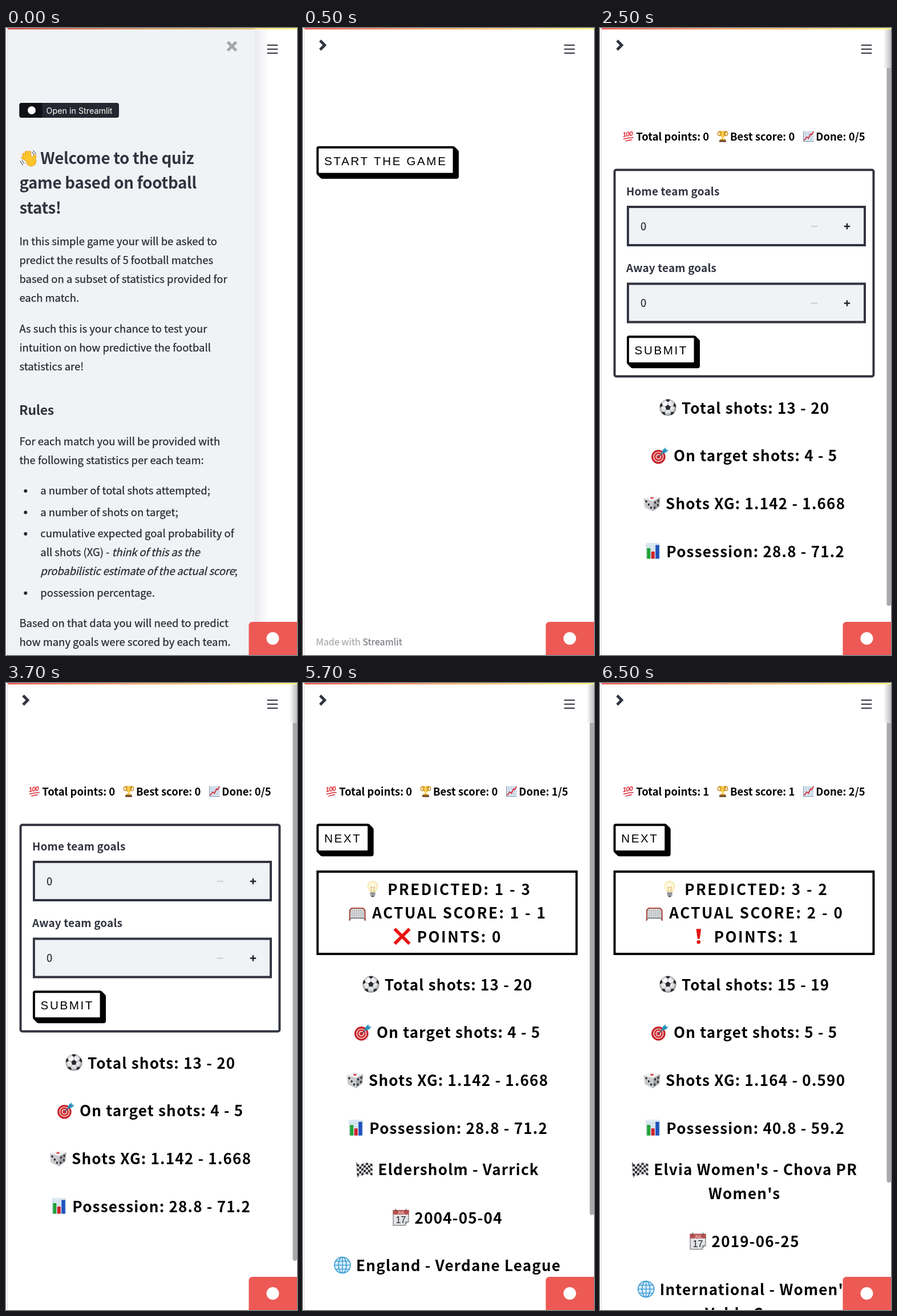
Write an HTML page with a canvas that moves like this. It is 510 px wide and 1097 px high and loops after 8 s.

```html
<!DOCTYPE html>
<html lang="en">
<head>
<meta charset="utf-8">
<title>Football quiz</title>
<style>
html, body { margin: 0; width: 100%; height: 100%; overflow: hidden; background: #fff; }
canvas { display: block; width: 510px; height: 1097px; }
</style>
</head>
<body>
<canvas id="stage"></canvas>
<script>
const W = 510, H = 1097, LOOP = 8000;
const INK = '#31333f', DARK = '#262730', PALE = '#f0f2f6';
const BODY = 20.64;
const SANS = '"Noto Sans CJK JP", "Noto Sans CJK SC", "Noto Sans CJK", "Open Sans", sans-serif';
const ARIAL = '"Liberation Sans", Arial, sans-serif';
const canvas = document.getElementById('stage');
const c = canvas.getContext('2d');
const dpr = window.devicePixelRatio || 1;
canvas.width = W * dpr;
canvas.height = H * dpr;

// ---- basic shapes
function box(x, y, w, h, col, r = 0) {
  c.fillStyle = col;
  c.beginPath();
  c.roundRect(x, y, w, h, r);
  c.fill();
}
function frame(x, y, w, h, lw, col, r = 0) {
  c.strokeStyle = col;
  c.lineWidth = lw;
  c.lineJoin = 'miter';
  c.beginPath();
  c.roundRect(x + lw / 2, y + lw / 2, w - lw, h - lw, r);
  c.stroke();
}
function dot(x, y, rx, col, ry = rx) {
  c.fillStyle = col;
  c.beginPath();
  c.ellipse(x, y, rx, ry, 0, 0, 7);
  c.fill();
}
function trace(p) {
  c.beginPath();
  for (let i = 0; i < p.length; i += 2) c.lineTo(p[i], p[i + 1]);
}
function poly(col, ...p) {
  trace(p);
  c.fillStyle = col;
  c.fill();
}
function line(col, lw, ...p) {
  trace(p);
  c.strokeStyle = col;
  c.lineWidth = lw;
  c.stroke();
}
function ring(x, y, rx, ry, col, lw, a = 0, b = 7) {
  c.strokeStyle = col;
  c.lineWidth = lw;
  c.beginPath();
  c.ellipse(x, y, rx, ry, 0, a, b);
  c.stroke();
}
function fade(x0, x1, ...cols) {
  const g = c.createLinearGradient(x0, 0, x1, 0);
  cols.forEach((col, i) => g.addColorStop(i / (cols.length - 1), col));
  return g;
}

// ---- text
function setFont(size, weight = 400, gap = 0, style = '') {
  // the CJK family draws its Latin letters about 12% larger
  c.font = `${style} ${weight} ${size / 1.1175}px ${SANS}`;
  c.letterSpacing = (weight === 600 ? gap - size * 0.005 : gap) + 'px';
}
function put(s, x, y, col) {
  c.fillStyle = col;
  c.fillText(s, x, y);
  return x + c.measureText(s).width;
}
function text(s, x, y, size = BODY, weight = 400, col = DARK, gap = 0, style = '') {
  setFont(size, weight, gap, style);
  if (weight === 400) {
    // a hairline gives regular text its slightly heavier look
    c.strokeStyle = col;
    c.lineWidth = 0.25;
    c.strokeText(s, x, y);
  }
  return put(s, x, y, col);
}
function plain(s, x, y, font, gap, col) {
  c.font = font;
  c.letterSpacing = gap + 'px';
  put(s, x, y, col);
}

// ---- pictograms, each in a 30 by 30 box
const icons = {
  wave() {
    c.lineCap = 'round';
    const skin = '#fcc42c', edge = '#e09a1c';
    const tips = [[6, 15], [7.5, 9.5], [12, 6], [17, 6]];
    for (const [x, y] of tips) line(edge, 5.4, 18, 21, x, y);
    line(edge, 5.6, 24, 21, 26, 12.5);
    dot(20, 21, 8.7, edge);
    for (const [x, y] of tips) line(skin, 4, 18, 21, x, y);
    line(skin, 4.2, 24, 21, 26, 12.5);
    dot(20, 21, 8, skin);
    for (const r of [9, 12.5]) {
      ring(14, 16, r + 1, r + 1, '#6b6b6e', 1.2, 2.2, 2.8);
      ring(16, 13, r, r, '#6b6b6e', 1.2, -0.95, -0.35);
    }
    c.lineCap = 'butt';
  },
  hundred() {
    c.save();
    c.translate(1, 17);
    c.rotate(-0.14);
    plain('100', 0, 0, 'italic 700 17.5px ' + ARIAL, -1, '#dc2430');
    c.restore();
    c.lineCap = 'round';
    line('#dc2430', 2.4, 3, 22, 15, 19.5, 28, 18);
    line('#dc2430', 2.2, 8, 27.5, 15, 25.5, 24, 24);
    c.lineCap = 'butt';
  },
  trophy() {
    ring(6.5, 8, 4.5, 5.5, '#c98a16', 2.2);
    ring(23.5, 8, 4.5, 5.5, '#c98a16', 2.2);
    poly(fade(6, 24, '#c98712', '#ffd95a', '#b8730c'), 6, 1, 24, 1, 22.5, 12, 17, 18, 17, 23, 13, 23, 13, 18, 7.5, 12);
    box(8, 22, 14, 3, '#d59a1f');
    box(6, 25, 18, 5, '#6b4020', 1);
  },
  rise() {
    box(1, 1, 28, 28, '#dbe6f0');
    for (let i = 8; i < 29; i += 7) {
      line('#b4c5d6', 1, 1, i, 29, i);
      line('#b4c5d6', 1, i, 1, i, 29);
    }
    line('#8096ab', 1.5, 1.5, 1, 1.5, 28.5, 29, 28.5);
    line('#d9232e', 2.6, 3, 26, 10, 17, 15, 20, 20, 9, 23, 11, 28, 2);
  },
  ball() {
    const g = c.createRadialGradient(12, 9, 2, 15, 15, 15);
    g.addColorStop(0, '#fff');
    g.addColorStop(0.7, '#dedfe1');
    g.addColorStop(1, '#85878b');
    dot(15, 15, 14.6, g);
    c.save();
    c.beginPath();
    c.arc(15, 15, 14.4, 0, 7);
    c.clip();
    const spot = (x, y, r, turn) => {
      const p = [];
      for (let i = 0; i < 5; i++) {
        const a = turn + i * Math.PI * 0.4;
        p.push(x + r * Math.cos(a), y + r * Math.sin(a));
      }
      poly('#2b2c30', ...p);
    };
    for (let i = 0; i < 5; i++) {
      const a = -Math.PI / 2 + i * Math.PI * 0.4;
      const x = 15 + 13.5 * Math.cos(a), y = 15 + 13.5 * Math.sin(a);
      line('#8b8d91', 0.8, 15, 15, x, y);
      spot(x, y, 3.8, a + Math.PI);
    }
    spot(15, 15, 5, -Math.PI / 2);
    c.restore();
  },
  target() {
    for (const [r, col] of [[12.3, '#c7242b'], [9, '#f3e6e4'], [7.6, '#d32a30'], [4.8, '#f3e6e4'], [3.2, '#d32a30']])
      dot(12.5, 17.5, r, col);
    line('#4c5662', 1.6, 12.5, 17.5, 22, 9);
    poly('#2c9bc4', 17.5, 12.5, 20, 5.5, 25, 1, 25, 5.5, 30, 5.5, 26, 10);
    line('#1b6f96', 1, 17.5, 12.5, 27, 4);
  },
  die() {
    poly('#f1f1f2', 0.5, 7, 14, 1.5, 29.5, 5, 17.5, 11.5);
    poly('#c9cacd', 0.5, 7, 17.5, 11.5, 16.5, 29.5, 2.5, 22.5);
    poly('#a3a5a9', 17.5, 11.5, 29.5, 5, 28, 21, 16.5, 29.5);
    dot(15, 6, 3, '#d3343a', 1.4);
    for (const [x, y] of [[5, 12], [9.3, 17.5], [13.5, 23]]) dot(x, y, 1.6, '#27282c', 2.1);
    for (const [x, y] of [[20.5, 14], [26, 11], [19.8, 23], [25.3, 18.5]]) dot(x, y, 1.5, '#27282c', 2);
  },
  bars() {
    box(3, 1, 25, 28, '#dce8f2');
    for (let y = 7; y < 28; y += 6) line('#bdcfdf', 0.8, 3, y, 28, y);
    box(5, 10, 6, 18.5, '#1fa336');
    box(12.5, 16, 6, 12.5, '#d3232b');
    box(20, 4.5, 6.5, 24, '#1f52bd');
  },
  bulb() {
    const g = c.createRadialGradient(14, 10, 1, 15, 11, 11);
    g.addColorStop(0, '#fffef0');
    g.addColorStop(0.6, '#fdf4cc');
    g.addColorStop(1, '#ecd9a0');
    poly('#f3e4b4', 6.5, 14, 23.5, 14, 19.5, 22, 10.5, 22);
    dot(15, 10.5, 9.5, g);
    line('#d9b060', 1, 13, 20, 12, 11, 15, 13, 18, 11, 17, 20);
    box(10.5, 21, 9, 6.5, '#a2a5a9', 1);
    line('#73767b', 1, 10.5, 23.5, 19.5, 23.5);
    box(12.5, 27, 5, 2.5, '#55585d', 1);
  },
  goal() {
    for (let i = 4; i < 29; i += 3.2) line('#96989d', 0.9, i, 8, i, 25);
    for (let y = 11; y < 26; y += 3.2) line('#96989d', 0.9, 2, y, 28, y);
    line('#707378', 1.3, 1, 29, 4, 25, 26, 25, 29, 29);
    line('#a8463f', 2, 1.3, 29.5, 1.8, 11, 5, 7.5, 25, 7.5, 28.2, 11, 28.7, 29.5);
  },
  cross() {
    line('#ea1410', 5.6, 2, 2, 28, 28);
    line('#ea1410', 5.6, 28, 2, 2, 28);
  },
  bang() {
    poly('#e01512', 10, 2, 18.5, 2, 16.2, 19.5, 12.3, 19.5);
    dot(14.2, 25, 3.2, '#e01512');
  },
  flag() {
    line('#57595e', 1.5, 1.5, 3, 4, 29);
    const sway = x => Math.sin(x / 4.2) * 1.5;
    for (let i = 0; i < 7; i++) for (let j = 0; j < 5; j++) {
      const x = 2 + i * 3.9, y = 5 + j * 4, x2 = x + 3.9;
      poly((i + j) % 2 ? '#dcdddf' : '#2a2b2f',
        x, y + sway(x), x2, y + sway(x2), x2, y + 4 + sway(x2), x, y + 4 + sway(x));
    }
  },
  calendar() {
    poly('#e3e4e6', 1, 2, 29, 2, 29, 22, 22, 29.5, 1, 29.5);
    frame(1, 2, 28, 27.5, 1.2, '#77797e');
    box(1, 2, 28, 8, '#b9514f');
    for (const x of [6, 24]) line('#55575c', 1.6, x, 0, x, 5);
    plain('JUL', 9.5, 8.8, '700 6.5px ' + ARIAL, 0, '#f4d9d8');
    plain('17', 6, 25, '16.5px ' + ARIAL, -0.5, '#232428');
    poly('#8d9095', 29, 21, 22, 29.5, 22, 22.5);
    poly('#fff', 30, 22.5, 30, 30, 22.5, 30);
  },
  globe() {
    dot(15, 15, 14, '#d9eefa');
    for (const rx of [14, 7]) ring(15, 15, rx, 14, '#3b9ad4', 1.6);
    line('#3b9ad4', 1.4, 15, 1, 15, 29);
    line('#3b9ad4', 1.4, 1, 15, 29, 15);
    line('#3b9ad4', 1.4, 3.5, 8, 26.5, 8);
    line('#3b9ad4', 1.4, 3.5, 22, 26.5, 22);
  }
};
function icon(name, x, y, size = 30) {
  c.save();
  c.translate(x, y);
  c.scale(size / 30, size / 30);
  c.letterSpacing = '0px';
  icons[name]();
  c.restore();
}

// ---- page parts
function stat(name, s, y, gap = 1.3, lead = 39) {
  const size = 29.2;
  setFont(size, 600, gap);
  if (!name) lead = 0;
  const x = 252.5 - (lead + c.measureText(s).width - gap) / 2;
  if (name) icon(name, x, y - 25.5);
  text(s, x + lead, y, size, 600, '#000', gap);
}
function stats(y, [shots, target, xg, poss]) {
  stat('ball', 'Total shots: ' + shots, y);
  stat('target', 'On target shots: ' + target, y + 83.7);
  stat('die', 'Shots XG: ' + xg, y + 167.3);
  stat('bars', 'Possession: ' + poss, y + 251);
}
function button(s, x, y, w) {
  for (let i = 0.5; i <= 6.5; i += 0.5) box(x + i, y + i, w, 50.5, '#000', 4);
  box(x, y, w, 50.5, '#000', 4);
  box(x + 3.9, y + 3.9, w - 7.8, 42.7, '#fff', 1);
  plain(s, x + 13.6, y + 33, BODY + 'px ' + ARIAL, 2.58, '#000');
}
function score(points, best, done) {
  const parts = [['hundred', 39.5, 63.3, 'Total points: ' + points],
    ['trophy', 205, 228, 'Best score: ' + best], ['rise', 355.5, 378.3, `Done: ${done}/5`]];
  for (const [name, ix, x, s] of parts) {
    icon(name, ix, 179.5, 20);
    text(s, x, 196.8, BODY, 700, '#000');
  }
}
function scrollbar(end) {
  box(502.5, 40, 7.5, end - 40, '#a9a9ac', 4);
  box(497, 2, 13, 68, fade(497, 510, '#ffffff', '#dedee0', '#bebec1'));
}
function field(label, y) {
  text(label, 46, y - 18.3, 21.2, 700, INK, 0.15);
  box(47, y, 419, 71, PALE);
  frame(47, y, 419, 71, 3.9, INK);
  text('0', 71, y + 42.8);
  line('#d0d2da', 2.4, 370, y + 36, 381, y + 36);
  line(DARK, 2.6, 427.8, y + 36, 438.2, y + 36);
  line(DARK, 2.6, 433, y + 30.8, 433, y + 41.2);
}

// ---- scenes
function sidebar() {
  const x = 23.4, li = 60.3;
  box(436, 2, 24, H, fade(436, 460, '#e9e9ea', '#f5f5f8', '#ffffff'));
  box(3, 2, 433, H, PALE);
  line('#a3a5aa', 5, 388.5, 24.5, 403.5, 39.5);
  line('#a3a5aa', 5, 403.5, 24.5, 388.5, 39.5);

  box(23.5, 131, 174.5, 26, DARK, 4);
  box(23.5, 131, 40, 26, '#0f1116', [4, 0, 0, 4]);
  dot(45, 144, 7, '#fff');
  plain('Open in Streamlit', 70.5, 149.5, '14.3px Inter, sans-serif', 0, '#fff');

  icon('wave', 23.5, 211.5, 31);
  const head = (s, hx, y) => text(s, hx, y, 30.96, 600, INK, -0.15);
  head('Welcome to the quiz', 60.3, 237.5);
  head('game based on football', x, 281.2);
  head('stats!', x, 324.9);

  [['In this simple game your will be asked to', 380],
   ['predict the results of 5 football matches', 413],
   ['based on a subset of statistics provided for', 446],
   ['each match.', 479],
   ['As such this is your chance to test your', 533],
   ['intuition on how predictive the football', 566],
   ['statistics are!', 599],
   ['For each match you will be provided with', 729.7],
   ['the following statistics per each team:', 762.7],
   ['Based on that data you will need to predict', 1048],
   ['how many goals were scored by each team.', 1081]
  ].forEach(([s, y]) => text(s, x, y));
  text('Rules', x - 0.4, 677, 25.7, 600, INK, -0.15);

  [['a number of total shots attempted;', 816.3],
   ['a number of shots on target;', 853.7],
   ['cumulative expected goal probability of', 891.2],
   ['possession percentage.', 995]
  ].forEach(([s, y]) => {
    text(s, li, y);
    dot(34.3, y - 6.3, 3, DARK);
  });
  const slant = (s, sx, y) => text(s, sx, y, BODY, 400, DARK, -0.18, 'italic');
  slant('think of this as the', text('all shots (XG) - ', li, 924.3), 924.3);
  text(';', slant('probabilistic estimate of the actual score', li, 957.3), 957.3);
}
function start() {
  button('START THE GAME', 23.6, 206.8, 242.9);
  const end = text('Made with ', 22.8, 1080, 18.06, 400, '#a9aaae');
  text('Streamlit', end, 1080, 18.06, 400, '#7c7d85');
}
function guess() {
  score(0, 0, 0);
  frame(23.6, 246.3, 457.8, 365.2, 3.9, INK, 3);
  field('Home team goals', 311);
  field('Away team goals', 445.5);
  button('SUBMIT', 47, 538.3, 121.5);
  stats(674.5, ['13 - 20', '4 - 5', '1.142 - 1.668', '28.8 - 71.2']);
  scrollbar(1011);
}
function result(predicted, actual, mark, points, values) {
  button('NEXT', 23.6, 246.3, 93.6);
  frame(23.6, 328, 457.8, 148, 3.9, '#000');
  stat('bulb', 'PREDICTED: ' + predicted, 370.5, 2.6, 41);
  stat('goal', 'ACTUAL SCORE: ' + actual, 412, 2.6, 41);
  stat(mark, 'POINTS: ' + points, 453.7, 2.6, 41);
  stats(537.7, values);
}
function miss() {
  score(0, 0, 1);
  result('1 - 3', '1 - 1', 'cross', 0, ['13 - 20', '4 - 5', '1.142 - 1.668', '28.8 - 71.2']);
  stat('flag', 'Eldersholm - Varrick', 861.3);
  stat('calendar', '2004-05-04', 945.5);
  stat('globe', 'England - Verdane League', 1029);
  scrollbar(931);
}
function hit() {
  score(1, 1, 2);
  result('3 - 2', '2 - 0', 'bang', 1, ['15 - 19', '5 - 5', '1.164 - 0.590', '40.8 - 59.2']);
  stat('flag', "Elvia Women's - Chova PR", 861.3);
  stat('', "Women's", 903.3);
  stat('calendar', '2019-06-25', 987.3);
  stat('globe', "International - Women's", 1071);
  stat('', 'Velda Cup', 1112.7);
  scrollbar(874);
}

const scenes = [[0, sidebar], [500, start], [2500, guess], [4500, miss], [6500, hit]];

function draw(t) {
  c.setTransform(dpr, 0, 0, dpr, 0, 0);
  box(0, 0, W, H, '#fff');
  const scene = scenes.filter(([at]) => t >= at).pop()[1];
  scene();
  box(2, 0, 1, H, '#dcdce0');
  box(3, 0, 507, 2.5, fade(3, 510, '#ee5a54', '#f6b070', '#fdf688'));
  if (scene === sidebar) box(3, 0, 433, 2.5, 'rgba(0,0,0,.12)');
  else line(INK, 4.8, 30, 22, 38, 30, 30, 38);
  for (const y of [30, 37, 44]) line(INK, 2, 457.7, y, 476.3, y);
  box(425.5, 1039, 84.5, 58, '#ed5a55', [6, 0, 0, 0]);
  dot(467.5, 1068, 11, '#fff');
}

const t0 = performance.now();
function tick() {
  draw((performance.now() - t0) % LOOP);
  requestAnimationFrame(tick);
}
tick();
</script>
</body>
</html>
```
